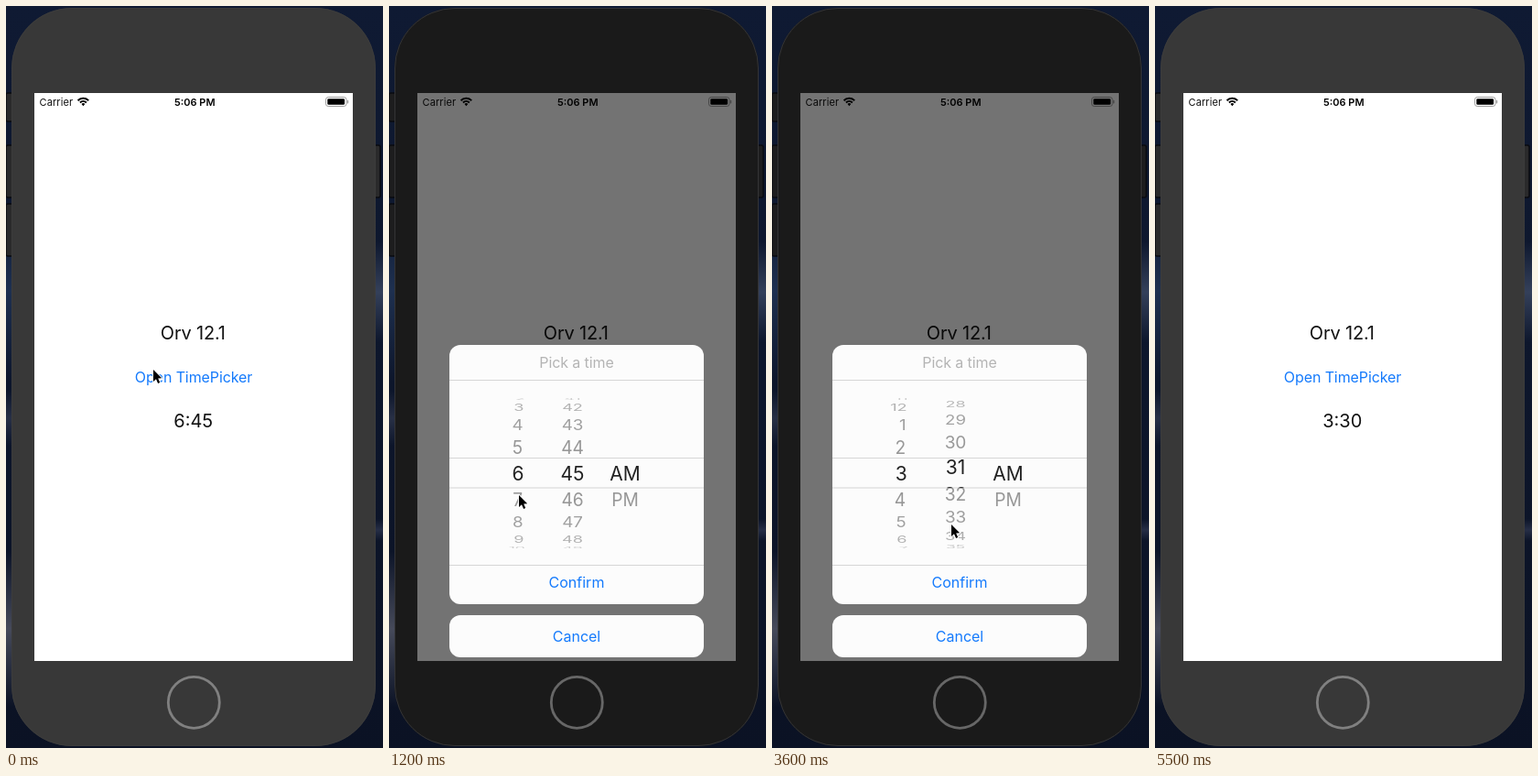
An HTML page with a canvas for the animation above (6.5 s loop, 412 px wide and 810 px high).

```html
<!DOCTYPE html>
<html lang="en">
<head>
<meta charset="utf-8">
<title>Time picker</title>
<style>
  html, body { margin: 0; width: 100%; height: 100%; overflow: hidden; background: #0d1730; }
  canvas { display: block; width: 412px; height: 810px; }
</style>
</head>
<body>
<canvas id="stage"></canvas>
<script>
const W = 412, H = 810, LOOP = 6500, STEP = 100;
const BLUE = '#147afc';
const OPEN = 500, CLOSING = 4000, CLOSED = 4300;
const canvas = document.getElementById('stage');
const ctx = canvas.getContext('2d');
const ratio = window.devicePixelRatio || 1;
canvas.width = W * ratio;
canvas.height = H * ratio;

const progress = (t, from, to) => Math.min(1, Math.max(0, (t - from) / (to - from)));
const easeOut = u => 1 - (1 - u) ** 2;
const smooth = u => u * u * (3 - 2 * u);

// Each wheel is flicked once and slows to rest
const hourAt = t => 6 - 3 * easeOut(progress(t, 1200, 1800));
const minuteAt = t => 45 - 15 * easeOut(progress(t, 2800, 3920));
const closeAt = t => progress(t, CLOSING, CLOSED) ** 2;

// Pointer stops: time, x, y
const STOPS = [
  [0, 161, 397], [400, 168, 402], [800, 168, 402], [1200, 142, 534], [1500, 142, 617],
  [2700, 199, 528], [3000, 200, 617], [3600, 196, 566], [4000, 226, 620], [4800, 285, 630]
];

function cursorAt(t) {
  const i = Math.max(1, STOPS.findIndex(s => s[0] >= t));
  const [t0, x0, y0] = STOPS[i - 1], [t1, x1, y1] = STOPS[i];
  const u = smooth(progress(t, t0, t1));
  return [x0 + (x1 - x0) * u, y0 + (y1 - y0) * u];
}

function box(x, y, w, h, r, fill) {
  ctx.beginPath();
  ctx.roundRect(x, y, w, h, r);
  if (fill) {
    ctx.fillStyle = fill;
    ctx.fill();
  }
}

function stroke(color, width) {
  ctx.strokeStyle = color;
  ctx.lineWidth = width;
  ctx.stroke();
}

function line(y) {
  ctx.fillStyle = '#d6d6d6';
  ctx.fillRect(66, y, 278, 1);
}

// Text whose capitals are centred on y
function text(str, x, y, size, color, { weight = 400, align = 'center', spacing = 0 } = {}) {
  ctx.font = `${weight} ${size}px Inter, sans-serif`;
  ctx.letterSpacing = spacing + 'px';
  ctx.textAlign = align;
  ctx.fillStyle = color;
  ctx.fillText(str, x, y + size * 0.364);
}

// Soft band of light on one side of the wallpaper
function glow(x, y, reach, rgb) {
  const g = ctx.createLinearGradient(0, y - reach, 0, y + reach);
  g.addColorStop(0, `rgba(${rgb},0)`);
  g.addColorStop(0.5, `rgba(${rgb},1)`);
  g.addColorStop(1, `rgba(${rgb},0)`);
  ctx.fillStyle = g;
  ctx.fillRect(x, y - reach, W / 2, reach * 2);
}

function wallpaper() {
  const g = ctx.createLinearGradient(0, 0, 0, H);
  g.addColorStop(0, '#0f1a33');
  g.addColorStop(1, '#0b1224');
  ctx.fillStyle = g;
  ctx.fillRect(0, 0, W, H);
  glow(0, 310, 100, '30,48,80');
  glow(0, 450, 30, '40,48,70');
  glow(0, 680, 85, '70,74,90');
  glow(W / 2, 312, 55, '52,64,90');
  glow(W / 2, 572, 12, '38,46,70');
}

function phone(active) {
  wallpaper();
  for (const [x, y, h] of [[0, 95, 31], [0, 152, 57], [0, 216, 57], [401, 152, 57]]) {
    box(x, y, 8, h, 2, active ? '#1d1d1e' : '#2a2a2b');
    stroke('#0a0b10', 1.5);
  }
  box(6, 2, 398, 806, 66, active ? '#1a1a1a' : '#383838');
  box(6.5, 2.5, 397, 805, 65.5);
  stroke(active ? '#343436' : '#3c3c3c', 1);
  ctx.beginPath();
  ctx.arc(205.3, 760.3, 28, 0, Math.PI * 2);
  stroke(active ? '#676767' : '#808080', 2.8);
}

function statusBar() {
  text('Carrier', 36.5, 104.5, 11, '#111', { align: 'left', spacing: 0.1 });
  text('5:06 PM', 206.3, 104.5, 11, '#000', { weight: 600 });

  const fan = r => {
    ctx.beginPath();
    ctx.arc(84.4, 108.7, r, -Math.PI * 0.76, -Math.PI * 0.24);
  };
  for (const r of [4.7, 8]) {
    fan(r);
    stroke('#000', 2);
  }
  fan(2.6);
  ctx.lineTo(84.4, 109.2);
  ctx.fillStyle = '#000';
  ctx.fill();

  box(349.5, 99.5, 22.5, 10, 2.7);
  stroke('#a0a0a0', 1);
  box(351.3, 101.2, 18.8, 6.6, 1.4, '#000');
  box(372.8, 102.8, 1.4, 3.6, 0.7, '#a0a0a0');
}

function wheelRows({ label, x, align, min = -99, max = 99 }, value, big) {
  const from = Math.max(min, Math.ceil(value - 4.4));
  const to = Math.min(max, Math.floor(value + 4.4));
  for (let i = from; i <= to; i++) {
    const angle = (i - value) * Math.PI / 9;
    const squash = Math.cos(angle);
    const tone = Math.round(150 + 75 * (1 - squash) ** 1.4);
    const lean = align === 'right' && !big ? 3.4 * (squash - 0.5) : 0;
    ctx.save();
    ctx.translate(x - lean, 510 + 83 * Math.sin(angle));
    ctx.scale(big ? 1 : 0.81 + 0.11 * squash, squash);
    text(label(i), 0, 0, 21, big ? '#222' : `rgb(${tone},${tone},${tone})`, { align, spacing: -0.1 });
    ctx.restore();
  }
}

// Grey drum outside the band, enlarged dark rows inside it
function wheels(list) {
  for (const big of [false, true]) {
    ctx.save();
    ctx.beginPath();
    if (big) {
      ctx.rect(66, 494, 278, 32);
    } else {
      ctx.rect(66, 428, 278, 66);
      ctx.rect(66, 526, 278, 66);
    }
    ctx.clip();
    for (const [wheel, value] of list) wheelRows(wheel, value, big);
    ctx.restore();
  }
}

const HOURS = { x: 147.5, align: 'right', label: i => String((i + 23) % 12 + 1) };
const MINUTES = { x: 200.5, align: 'center', label: i => String((i + 60) % 60).padStart(2, '0') };
const HALVES = { x: 258, align: 'center', min: 0, max: 1, label: i => ['AM', 'PM'][i] };

function sheet(t) {
  const closed = closeAt(t);
  ctx.fillStyle = `rgba(0,0,0,${0.55 * (1 - closed)})`;
  ctx.fillRect(31, 95, 348, 620);
  ctx.translate(0, 348 * closed);
  box(66, 370, 278, 283, 12, '#fcfcfc');
  box(66, 665, 278, 46, 12, '#fcfcfc');
  text('Pick a time', 205, 389.5, 16, '#b4b4b4', { spacing: -0.1 });
  [408, 493, 525.5, 610].forEach(line);
  wheels([[HOURS, hourAt(t)], [MINUTES, minuteAt(t)], [HALVES, 0]]);
  text('Confirm', 205, 628.8, 16, BLUE);
  text('Cancel', 205, 687.8, 16, BLUE);
}

function screen(t) {
  ctx.save();
  ctx.beginPath();
  ctx.rect(31, 95, 348, 620);
  ctx.clip();
  ctx.fillStyle = '#fff';
  ctx.fillRect(31, 95, 348, 620);
  statusBar();
  text('Orv 12.1', 204.3, 356.8, 20, '#111', { spacing: -0.2 });
  const pressed = t >= 300 && t < OPEN;
  text('Open TimePicker', 205, 405.2, 16, pressed ? '#d0e2fb' : BLUE, { spacing: -0.1 });
  text(t < CLOSED - STEP ? '6:45' : '3:30', 204.7, 453.2, 20, '#111');
  if (t >= OPEN && t < CLOSED) sheet(t);
  ctx.restore();
}

function cursor(x, y) {
  ctx.save();
  ctx.translate(x, y);
  ctx.beginPath();
  for (const [px, py] of [[0, 0], [0, 13], [3, 10.3], [5.1, 15], [7.2, 14.1], [5.2, 9.4], [9.2, 9.3]]) {
    ctx.lineTo(px, py);
  }
  ctx.closePath();
  ctx.lineJoin = 'round';
  stroke('#fff', 1.8);
  ctx.fillStyle = '#000';
  ctx.fill();
  ctx.restore();
}

function draw(t) {
  ctx.setTransform(ratio, 0, 0, ratio, 0, 0);
  phone(t >= 200 && t < 5500);
  screen(t);
  if (t < 4900) cursor(...cursorAt(t));
}

const start = performance.now();
function tick() {
  const t = (performance.now() - start) % LOOP;
  draw(Math.floor(t / STEP) * STEP);
  requestAnimationFrame(tick);
}
tick();
</script>
</body>
</html>
```
